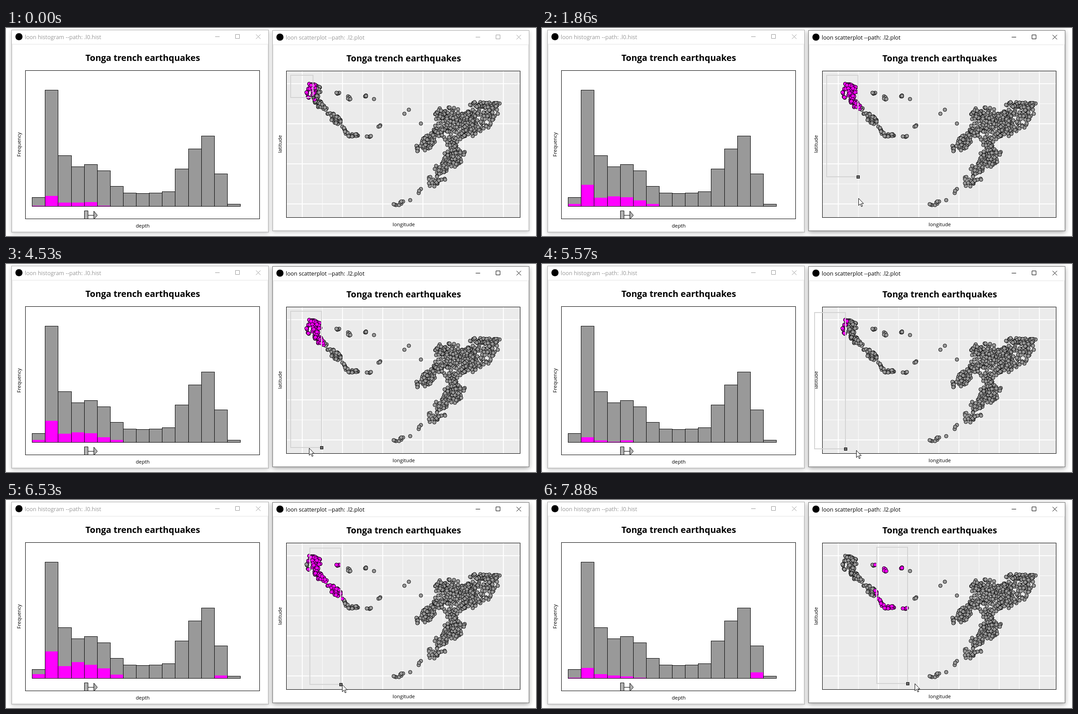
These frames come from a looping animation (1186 px wide and 467 px high, 8 s). An HTML page:

```html
<!DOCTYPE html>
<html lang="en">
<head>
<meta charset="utf-8">
<title>Linked brushing</title>
<style>
html, body { margin: 0; width: 100%; height: 100%; overflow: hidden; background: #fff; }
svg { display: block; width: 1186px; height: 467px; }
text { font-family: "Open Sans", "Noto Sans", sans-serif; }
.bar { font-size: 12.5px; }
.head { font-size: 19.6px; font-weight: 700; text-anchor: middle; }
.axis { font-size: 11.3px; text-anchor: middle; }
</style>
</head>
<body>
<svg id="stage" viewBox="0 0 1186 467">
  <defs>
    <filter id="soft" x="-5%" y="-5%" width="110%" height="112%">
      <feDropShadow dx="0" dy="3" stdDeviation="5" flood-opacity=".2"/>
    </filter>
    <filter id="strong" x="-5%" y="-5%" width="110%" height="112%">
      <feDropShadow dx="0" dy="3" stdDeviation="5.5" flood-opacity=".36"/>
    </filter>
  </defs>
</svg>
<script>
const LOOP = 8000, FOCUS = 560, GRAB = 5180;
const PINK = '#ff00ff', GREY = '#999999';
const stage = document.getElementById('stage');

function set(el, attrs) {
  for (const k in attrs) el.setAttribute(k, attrs[k]);
}
function add(parent, tag, attrs, text) {
  const el = document.createElementNS('http://www.w3.org/2000/svg', tag);
  set(el, attrs);
  if (text) el.textContent = text;
  parent.appendChild(el);
  return el;
}
const show = (el, on) => set(el, { visibility: on ? 'visible' : 'hidden' });

// Windows
function makeWindow(x, y, w, h, caption) {
  const g = add(stage, 'g', {});
  const frame = add(g, 'rect', { x: x + .5, y: y + .5, width: w - 1, height: h - 1, fill: '#fff' });
  add(g, 'rect', { x: x + 2, y: y + 32.5, width: w - 4, height: h - 34.5, fill: 'none', stroke: '#f0f0f0', 'stroke-width': 2 });
  add(g, 'circle', { cx: x + 17, cy: y + 15.5, r: 8, fill: '#000' });
  const label = add(g, 'text', { class: 'bar', x: x + 30, y: y + 21 }, caption);
  const r = x + w, m = y + 15.5;
  const icons = add(g, 'path', {
    d: `M${r - 120} ${m}h10M${r - 74.5} ${m - 5}h9v9h-9zM${r - 28.5} ${m - 5}l10 10m0-10l-10 10`,
    fill: 'none'
  });
  function focus(on) {
    const ink = on ? '#000' : '#999';
    set(frame, { stroke: on ? '#707070' : '#aaaaaa', filter: on ? 'url(#strong)' : 'url(#soft)' });
    set(label, { fill: ink });
    set(icons, { stroke: ink });
  }
  focus(false);
  return { g, focus };
}
const left = makeWindow(12, 4, 576, 455, 'loon histogram --path: .l0.hist');
const right = makeWindow(596, 5, 575, 451, 'loon scatterplot --path: .l2.plot');

function labels(g, cx, titleY, xName, xY, yName, yX, yMid) {
  add(g, 'text', { class: 'head', x: cx, y: titleY }, 'Tonga trench earthquakes');
  add(g, 'text', { class: 'axis', x: cx, y: xY }, xName);
  add(g, 'text', { class: 'axis', transform: `translate(${yX} ${yMid}) rotate(-90)` }, yName);
}
labels(left.g, 306, 74, 'depth', 448, 'Frequency', 33, 261.5);
labels(right.g, 890, 75, 'longitude', 445, 'latitude', 617, 260.5);

// Histogram
const BASE = 400, PER_QUAKE = 1.27;
const bars = [20, 261, 114, 89, 94, 80, 45, 30, 29, 30, 33, 84, 129, 158, 73, 5];
const edge = i => Math.round(58.16 + i * 29.12) + .5;
add(left.g, 'rect', { x: 43.5, y: 95.5, width: 524, height: 333, fill: '#fff', stroke: '#000' });
const fills = bars.map((h, i) => {
  const x = edge(i), w = edge(i + 1) - x;
  add(left.g, 'rect', { x, y: BASE - h + .5, width: w, height: h, fill: GREY, stroke: '#000' });
  return add(left.g, 'rect', { x: x + .5, width: w - 1, fill: PINK });
});
add(left.g, 'path', {
  d: 'M175.5 428V410.5h8V428M183.5 420.5h13M196.5 428V411l8 9.5l-6.5 7.5',
  fill: '#b3b3b3', stroke: '#000'
});

// Scatterplot
const panel = { x: 627.5, y: 96.5, width: 523, height: 329 };
add(right.g, 'rect', { ...panel, fill: '#ebebeb' });
function grid(n, line) {
  for (let i = 0; i < n; i++)
    add(right.g, 'path', { d: line(i * 45), stroke: '#fff', 'stroke-width': i % 2 ? 1 : 2 });
}
grid(11, d => `M${663 + d} 97V425`);
grid(7, d => `M628 ${125 + d}H1150`);
add(right.g, 'rect', { ...panel, fill: 'none', stroke: '#000' });

let seed = 71;
const rnd = () => (seed = seed * 16807 % 2147483647) / 2147483647;

// Quakes strewn along a line: count, spread, then both ends
function strand([n, spread, x1, y1, x2, y2]) {
  return Array.from({ length: n }, () => {
    const f = rnd(), a = rnd() * 2 * Math.PI, r = spread * Math.sqrt(rnd());
    return {
      x: Math.round(x1 + (x2 - x1) * f + r * Math.cos(a)),
      y: Math.round(y1 + (y2 - y1) * f + r * Math.sin(a))
    };
  });
}
const west = [
  [44, 9, 680, 132, 699, 138], [42, 8, 692, 146, 698, 171], [7, 2, 672, 143, 679, 160],
  [14, 6, 704, 172, 713, 180], [3, 3, 713, 187, 728, 195], [44, 9, 733, 199, 744, 211],
  [10, 4, 751, 222, 765, 238], [14, 3, 764, 242, 790, 239], [5, 2, 804, 243, 819, 242],
  [3, 1, 823, 228, 841, 216], [5, 2, 738, 146, 747, 145], [5, 4, 762, 154, 780, 164],
  [4, 2, 800, 153, 808, 151], [1, 0, 823, 159, 823, 159]
].flatMap(strand);
const east = [
  [60, 8, 1044, 171, 1098, 174], [32, 13, 1040, 190, 1092, 186], [10, 8, 1076, 215, 1098, 197],
  [8, 6, 966, 184, 1016, 180], [70, 9, 966, 193, 987, 194], [165, 24, 977, 212, 1048, 210],
  [42, 15, 1030, 234, 1068, 216], [50, 10, 955, 238, 985, 228], [76, 14, 938, 261, 952, 248],
  [30, 14, 978, 250, 1028, 240], [18, 8, 998, 260, 1004, 275], [62, 15, 987, 289, 1013, 285],
  [12, 8, 1016, 294, 998, 312], [32, 12, 964, 317, 985, 313], [26, 13, 947, 349, 975, 335],
  [9, 4, 867, 398, 906, 382], [3, 3, 918, 372, 934, 358], [6, 3, 918, 263, 919, 278],
  [2, 1, 891, 192, 906, 180], [1, 0, 928, 214, 928, 214]
].flatMap(strand);

// Depth classes: the ends of the arc are shallow, its middle reaches deeper, the northern branch is deepest
const shallow = [1, 2, 1, 3, 1, 2, 1, 4];
const mixed = [1, 3, 5, 2, 1, 4, 3, 1, 5, 2, 0, 3, 1, 4, 5, 3, 1, 2, 6, 4];
function depthClass({ x, y }, i) {
  if (x > 730 && y < 170) return 14;
  const list = x < 690 || x > 750 ? shallow : mixed;
  return list[i % list.length];
}

const dot = (q, fill) =>
  add(right.g, 'circle', { cx: q.x + .5, cy: q.y + .5, r: 4, fill, stroke: '#000' });
[...west, ...east].forEach(q => dot(q, GREY));
const marks = west.map((q, i) => ({ ...q, depth: depthClass(q, i), el: dot(q, PINK) }));

// Brush and pointer
const brush = add(stage, 'rect', { fill: 'none', stroke: '#d3d3d3', 'stroke-width': 2 });
const grip = add(stage, 'rect', { width: 6, height: 6, fill: '#6c6c6c', stroke: '#000' });
const pointer = add(stage, 'path', {
  d: 'M.5 .5V16.5L4.2 13L6.8 19L9.2 18L6.6 12.2H11.5Z', fill: '#fff', stroke: '#000'
});

// Time, brush corner x, y, pointer x, y
const resize = [
  [0, 687, 156, 688, 158],
  [860, 687, 156, 688, 160],
  [1590, 700, 238, 703, 290],
  [1860, 707, 334, 708, 382],
  [2280, 707, 408, 708, 409],
  [3420, 706, 409, 706, 412],
  [3570, 706, 412, 706, 412],
  [3840, 706, 412, 706, 412],
  [4530, 706, 412, 678, 413]
];
const drag = [
  [GRAB, 679, 415, 680, 415],
  [5570, 679, 415, 703, 418],
  [6110, 727, 415, 733, 416],
  [6530, 749, 414, 752, 414],
  [7190, 773, 414, 789, 413],
  [7880, 818, 412, 834, 412]
];
function sample(keys, t) {
  const i = keys.findIndex(k => k[0] > t);
  if (i < 0) return keys[keys.length - 1].slice(1);
  const a = keys[i - 1], b = keys[i], span = b[0] - a[0];
  const steps = Math.round(span / 140);
  const f = Math.floor((t - a[0]) / span * steps) / steps;
  return a.slice(1).map((v, j) => Math.round(v + (b[j + 1] - v) * f));
}

let shown = '';
function draw(t) {
  const dragging = t >= GRAB, active = t >= FOCUS;
  const [r, b, px, py] = sample(dragging ? drag : resize, t);
  const key = [r, b, px, py, active].join();
  if (key === shown) return;
  shown = key;

  const l = dragging ? r - 69 : 637, top = dragging ? b - 306 : 106;
  right.focus(active);
  set(brush, { x: l, y: top, width: r - l, height: b - top });
  set(grip, { x: r - 2.5, y: b - 2.5 });
  set(pointer, { transform: `translate(${px} ${py})` });
  show(pointer, active);

  const counts = bars.map(() => 0);
  for (const q of marks) {
    const hit = q.x > l - 5 && q.x < r + 5 && q.y > top - 5 && q.y < b + 5;
    show(q.el, hit);
    if (hit) counts[q.depth]++;
  }
  fills.forEach((el, i) => {
    const h = Math.min(bars[i], Math.round(counts[i] * PER_QUAKE));
    set(el, { y: BASE - h, height: h });
  });
}

const start = performance.now();
function loop() {
  draw((performance.now() - start) % LOOP);
  requestAnimationFrame(loop);
}
loop();
</script>
</body>
</html>
```
